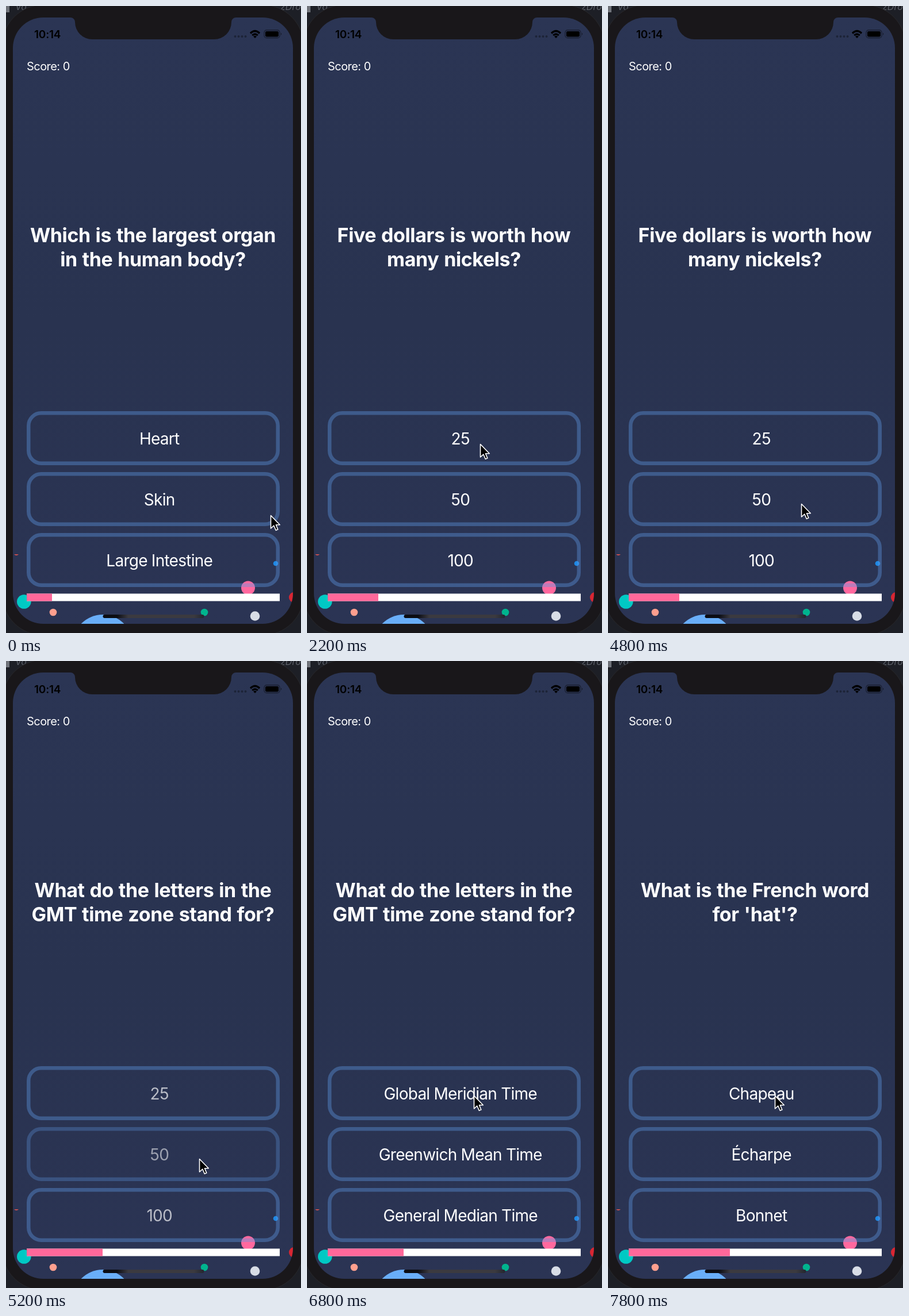
These frames come from a looping animation (513x1091 px, 8000 ms). An HTML page:

```html
<!DOCTYPE html>
<html lang="en">
<head>
<meta charset="utf-8">
<title>Quiz</title>
<style>
  html, body { margin: 0; width: 100%; height: 100%; overflow: hidden; background: #1d1f26; }
  svg { display: block; width: 100%; height: 100%; font-family: Inter, "Open Sans", sans-serif; }
  .question { font-size: 34px; font-weight: 700; letter-spacing: -.4px; word-spacing: 1.2px; fill: #fff; text-anchor: middle; }
  .answer { font-size: 28px; letter-spacing: -.74px; fill: #fff; text-anchor: middle; }
  .score { font-size: 20px; letter-spacing: -.55px; fill: #fff; }
  .clock { font-size: 19px; font-weight: 600; letter-spacing: -.2px; }
  .desk { font-size: 16px; font-style: italic; fill: #5c6069; }
</style>
</head>
<body>
<svg viewBox="0 0 513 1091" preserveAspectRatio="none">
  <defs>
    <linearGradient id="sky" x2="0" y2="1">
      <stop offset="0" stop-color="#2b3554"/>
      <stop offset=".5" stop-color="#293350"/>
      <stop offset="1" stop-color="#2b3454"/>
    </linearGradient>
    <linearGradient id="home">
      <stop offset=".14" stop-color="#0c0d13"/>
      <stop offset=".25" stop-color="#3b3a40"/>
      <stop offset=".9" stop-color="#3b3a40"/>
      <stop offset="1" stop-color="#23262f"/>
    </linearGradient>
    <clipPath id="screen"><rect x="12" y="20" width="487" height="1055" rx="53"/></clipPath>
  </defs>

  <rect width="513" height="1091" fill="#1d1f26"/>
  <rect width="6" height="11" fill="#70737a"/>
  <text class="desk" x="16" y="7">Vo</text>
  <text class="desk" x="477" y="7">zDro</text>
  <rect x="-7" y="-2" width="525" height="1097" rx="72" fill="#19171a" stroke="#28282b"/>

  <g clip-path="url(#screen)">
    <rect x="12" y="20" width="487" height="1055" fill="url(#sky)"/>
    <g id="bubbles"></g>
    <path d="M14 954Q18 958 22 954Z" fill="#d9534f"/>
    <text class="score" x="36" y="112">Score: 0</text>
    <text class="question" x="255.5" y="411"></text>
    <text class="question" x="255.5" y="453"></text>
    <g id="buttons"></g>
    <rect x="36" y="1022.500" width="440" height="13" fill="#fff"/>
    <rect id="bar" x="36" y="1022.500" width="44" height="13" fill="#ff689a"/>
    <rect x="168.500" y="1059" width="176" height="6" rx="3" fill="url(#home)"/>

    <path d="M112 19V20A8 8 0 0 1 120 28A30 30 0 0 0 150 58H362A30 30 0 0 0 392 28A8 8 0 0 1 400 20V19Z" fill="#19171a"/>
    <text class="clock" x="49" y="55.500">10:14</text>
    <path d="M398.500 53h20" stroke="#000" stroke-opacity=".35" stroke-width="4" stroke-linecap="round" stroke-dasharray="0 6"/>
    <g fill="none" stroke="#000" stroke-width="3.200">
      <path d="M425 47.500Q433 39.500 441 47.500M428.300 51.200Q433 46.600 437.700 51.200"/>
      <path d="M433 55.500l-2.300-2.400q2.300-2 4.600 0z" fill="#000" stroke-width="1"/>
    </g>
    <rect x="449" y="42" width="27" height="13.500" rx="4" fill="none" stroke="#000" stroke-opacity=".45" stroke-width="1.300"/>
    <rect x="451" y="44" width="23" height="9.500" rx="2.200"/>
    <path d="M478 46.500q2.500 2.200 0 4.500z" opacity=".5"/>
  </g>

  <path id="pointer" d="M.5 1.500V24L5.800 19.200L9.300 27.300L12.800 25.800L9.500 17.800H16.300Z"
        stroke="#fff" stroke-width="1.600" stroke-linejoin="round"/>
</svg>

<script>
const LOOP = 8000, STEP = 200;

const quiz = [
  ["Which is the largest organ", "in the human body?", "Heart", "Skin", "Large Intestine"],
  ["Five dollars is worth how", "many nickels?", "25", "50", "100"],
  ["What do the letters in the", "GMT time zone stand for?", "Global Meridian Time", "Greenwich Mean Time", "General Median Time"],
  ["What is the French word", "for 'hat'?", "Chapeau", "Écharpe", "Bonnet"]
];

// click time, button pressed
const clicks = [[1400, 0], [5000, 1], [7200, 0]];

// start, end, then the pointer tip on arrival
const moves = [[0, 0, 460, 885], [600, 1200, 301, 761], [4000, 4600, 336, 865], [5800, 6600, 290, 755]];

// x, y, radius, colour
const bubbles = [
  [31.3, 1036.5, 12.3, "#00c9c4"], [82, 1055, 6.3, "#ff9f8e"], [168, 1110.5, 51.5, "#69aef8"],
  [345, 1055, 6.3, "#00b48e"], [433, 1061.5, 8.3, "#d8dde6"], [421, 1012.5, 12, "#ff689e"],
  [469, 970, 4.3, "#1e88e5"], [501, 1029, 9, "#d92632"]
];

const $ = id => document.getElementById(id);

function add(parent, tag, attrs) {
  const el = document.createElementNS("http://www.w3.org/2000/svg", tag);
  for (const key in attrs) el.setAttribute(key, attrs[key]);
  return parent.appendChild(el);
}

for (const [cx, cy, r, fill] of bubbles) add($("bubbles"), "circle", { cx, cy, r, fill });

const buttons = [0, 1, 2].map(i => {
  const y = 705 + 106 * i;
  const red = add($("buttons"), "rect", { x: 36, y, width: 440, height: 94, fill: "#f00" });
  const face = add($("buttons"), "g", {});
  add(face, "rect", {
    x: 39.25, y: y + 3.25, width: 433.5, height: 87.5, rx: 22,
    fill: "none", stroke: "#5c97e0", "stroke-opacity": .4, "stroke-width": 6.5
  });
  const label = add(face, "text", { class: "answer", x: 266.7, y: y + 57.8 });
  return { red, face, label };
});
const lines = document.querySelectorAll(".question");

const ease = p => p * p * (3 - 2 * p);

function pointerAt(t) {
  let [, , x, y] = moves[0];
  for (const [start, end, toX, toY] of moves.slice(1)) {
    const p = ease(Math.min(1, Math.max(0, (t - start) / (end - start))));
    x += (toX - x) * p;
    y += (toY - y) * p;
  }
  return [x, y];
}

function draw(t) {
  const done = clicks.filter(c => t >= c[0]).length;
  const [time, pressed] = done ? clicks[done - 1] : [-LOOP, -1];
  const since = t - time;
  const wrong = since < 200, fading = !wrong && since < 400, settling = since >= 400 && since < 600;
  const question = quiz[wrong ? done - 1 : done];
  const answers = quiz[since < 400 ? done - 1 : done];

  lines.forEach((el, i) => el.textContent = question[i]);
  $("bar").setAttribute("width", 44 * (wrong ? done : done + 1));

  buttons.forEach(({ red, face, label }, i) => {
    const hit = i === pressed;
    label.textContent = answers[i + 2];
    red.setAttribute("visibility", hit && wrong ? "visible" : "hidden");
    face.setAttribute("opacity", !hit ? 1 : wrong ? .4 : fading ? .8 : 1);
    label.setAttribute("opacity", fading ? .68 : settling && hit ? .8 : 1);
  });

  $("pointer").setAttribute("transform", `translate(${pointerAt(t)})`);
}

function tick() {
  const t = performance.now() % LOOP;
  draw(Math.floor(t / STEP) * STEP);
  requestAnimationFrame(tick);
}
tick();
</script>
</body>
</html>
```
